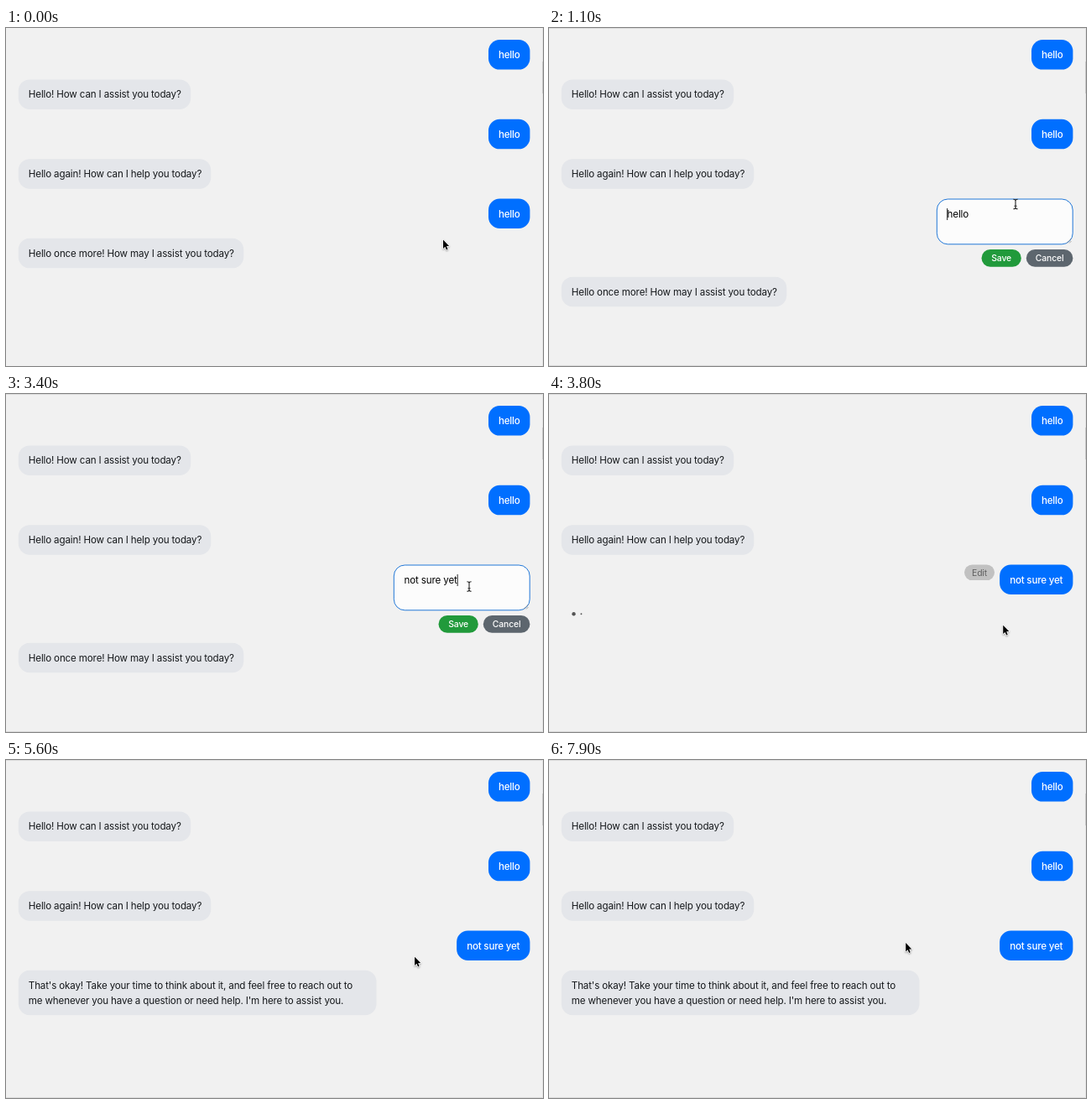
These frames come from a looping animation (640 by 403 pixels, 8 s). An HTML page with a canvas:

```html
<!DOCTYPE html>
<html lang="en">
<head>
<meta charset="utf-8">
<title>Chat message editing</title>
<style>
  html, body { margin: 0; width: 100%; height: 100%; overflow: hidden; background: #f1f1f1; }
  canvas { display: block; width: 640px; height: 403px; }
</style>
</head>
<body>
<canvas id="stage"></canvas>
<script>
const W = 640, H = 403, LOOP = 8000, STEP = 100;
const LEFT = 14.8, RIGHT = 624.4, BUBBLE_H = 35.5, LINE_H = 17.9, PAD = 12;
const FONT = 'Inter, "Liberation Sans", sans-serif';
const EDIT_AT = 700, SELECT_AT = 1700, TYPE_AT = 1900, SAVE_AT = 3750;
const STREAM_AT = 4200, STREAM_END = 4900;
const KEY_MS = 110, WORDS_PER_STEP = 3.5;

const OLD_REPLY = 'Hello once more! How may I assist you today?';
const TYPED = 'not sure yet';
const REPLY = [
  "That's okay! Take your time to think about it, and feel free to reach out to",
  "me whenever you have a question or need help. I'm here to assist you."
].map(line => line.split(' '));

// Pointer stops: time, x, y
const STOPS = [
  [0, 521, 252], [400, 556, 210], [1500, 556, 210], [1800, 552, 229.5],
  [3400, 552, 229.5], [3800, 541.2, 275.2], [5000, 541.2, 274.2], [5900, 460, 214],
  [6200, 493, 214], [6700, 401, 213.7], [7700, 475, 196], [7900, 425.2, 217.5]
];
const ARROW = new Path2D('M0 0V10.3L2.3 8.2L4 11.8L5.5 11.1L4 7.5L7.1 7.3Z');

const canvas = document.getElementById('stage');
const ctx = canvas.getContext('2d');
const dpr = window.devicePixelRatio || 1;
canvas.width = W * dpr;
canvas.height = H * dpr;

const rowY = i => 14.1 + i * 47.35;
const clamp = v => Math.max(0, Math.min(1, v));

function setFont(size = 11.6, weight = 400, spacing = -0.15) {
  ctx.font = `${weight} ${size}px ${FONT}`;
  ctx.letterSpacing = spacing + 'px';
}

function text(str, x, y, color, align = 'left') {
  ctx.fillStyle = color;
  ctx.textAlign = align;
  ctx.fillText(str, x, y);
}

function rect(x, y, w, h, color) {
  ctx.fillStyle = color;
  ctx.fillRect(x, y, w, h);
}

function roundBox(x, y, w, h, r, fill, stroke) {
  ctx.beginPath();
  ctx.roundRect(x, y, w, h, r);
  ctx.fillStyle = fill;
  ctx.fill();
  if (!stroke) return;
  ctx.strokeStyle = stroke;
  ctx.lineWidth = 1;
  ctx.stroke();
}

function botBubble(lines, y, w) {
  roundBox(LEFT, y, w, BUBBLE_H + (lines.length - 1) * LINE_H, 13.4, '#e4e6ea');
  setFont();
  lines.forEach((line, i) => text(line, LEFT + PAD, y + 22 + i * LINE_H, '#15181b'));
}

function userBubble(str, y, w) {
  roundBox(RIGHT - w, y, w, BUBBLE_H, 13.4, '#006fff');
  setFont(11.6, 500, -0.2);
  text(str, RIGHT - w / 2, y + 22, '#fff', 'center');
}

function pill(label, x, y, w, h, fill, color, weight) {
  roundBox(x, y, w, h, h / 2, fill);
  setFont(10.4, weight);
  text(label, x + w / 2, y + h / 2 + 3.7, color, 'center');
}

function editPill(right, alpha) {
  ctx.globalAlpha = clamp(alpha);
  pill('Edit', right - 36, rowY(4), 36, 18.6, '#c1c1c1', '#5f5f5f', 400);
  ctx.globalAlpha = 1;
}

function resizeGrip(x, y) {
  ctx.strokeStyle = '#8a8a8a';
  ctx.lineWidth = 0.7;
  ctx.beginPath();
  for (const d of [5.5, 2.5]) {
    ctx.moveTo(x - d, y);
    ctx.lineTo(x, y - d);
  }
  ctx.stroke();
}

function editor(t) {
  const x = 474.6;
  roundBox(462.3, 204, 161.9, 53.8, 13, '#fcfcfc', '#2278d8');
  resizeGrip(622.5, 256.5);

  const typing = t >= TYPE_AT;
  const selected = t >= SELECT_AT && !typing;
  const str = typing ? TYPED.slice(0, 1 + Math.floor((t - TYPE_AT) / KEY_MS)) : 'hello';
  setFont();
  const w = ctx.measureText(str).width;
  if (selected) rect(x, 215, w, 14, '#b3d7ff');
  text(str, x, 226.3, '#000');
  if (!selected) rect(typing ? x + w : x - 0.4, 215, 0.9, 14, '#111');

  pill('Save', 515.5, 264, 47.3, 20.8, '#219a3b', '#fff', 500);
  pill('Cancel', 568.8, 264, 55.6, 20.8, '#5d666e', '#fff', 500);
}

function typingDots(t) {
  for (let i = 0; i < 3; i++) {
    const phase = ((t - SAVE_AT + 320 - i * 160) / 1400) % 1;
    const up = phase > 0 ? clamp(1 - Math.abs(phase - 0.4) / 0.4) : 0;
    ctx.beginPath();
    ctx.arc(29.5 + i * 8.95, 262.3, 3 * up * up * (3 - 2 * up), 0, Math.PI * 2);
    ctx.fillStyle = '#555';
    ctx.fill();
  }
}

function reply(t) {
  const count = t < STREAM_END ? Math.floor((t - STREAM_AT) / STEP * WORDS_PER_STEP) : Infinity;
  const first = REPLY[0].slice(0, count).join(' ');
  const second = REPLY[1].slice(0, Math.max(0, count - REPLY[0].length)).join(' ');
  setFont();
  const w = second ? 426.7 : ctx.measureText(first).width + PAD * 2;
  botBubble(second ? [first, second] : [first], rowY(5), w);
}

function pointerAt(t) {
  const i = STOPS.findIndex(stop => stop[0] > t);
  if (i < 0) return STOPS.at(-1).slice(1);
  const [t0, x0, y0] = STOPS[i - 1], [t1, x1, y1] = STOPS[i];
  const k = (t - t0) / (t1 - t0);
  return [x0 + (x1 - x0) * k, y0 + (y1 - y0) * k];
}

function arrow(x, y) {
  ctx.save();
  ctx.translate(x, y + 0.6);
  ctx.lineJoin = 'round';
  ctx.strokeStyle = '#fff';
  ctx.lineWidth = 1.5;
  ctx.shadowColor = 'rgba(0, 0, 0, 0.35)';
  ctx.shadowBlur = 2 * dpr;
  ctx.shadowOffsetY = dpr;
  ctx.stroke(ARROW);
  ctx.shadowColor = 'transparent';
  ctx.fillStyle = '#000';
  ctx.fill(ARROW);
  ctx.restore();
}

function iBeam(x, y) {
  ctx.beginPath();
  for (const s of [-1, 1]) {
    ctx.moveTo(x - 2.6, y + s * 5.8);
    ctx.quadraticCurveTo(x, y + s * 5.8, x, y + s * 4);
    ctx.quadraticCurveTo(x, y + s * 5.8, x + 2.6, y + s * 5.8);
  }
  ctx.moveTo(x, y - 4.5);
  ctx.lineTo(x, y + 4.5);
  ctx.moveTo(x - 1.5, y + 2.2);
  ctx.lineTo(x + 1.5, y + 2.2);
  ctx.strokeStyle = '#222';
  ctx.lineWidth = 1.1;
  ctx.stroke();
}

function frameEdges(t) {
  if (t >= EDIT_AT) {
    rect(0, 0, W, 1, '#dcdcdc');
    rect(0, H - 1, W, 1, '#dcdcdc');
  }
  rect(W - 1, 0, 1, H, '#e4e4e4');
  rect(W - 1, 40, 1, 38, '#c8c8c8');
}

function draw(t) {
  ctx.setTransform(dpr, 0, 0, dpr, 0, 0);
  rect(0, 0, W, H, '#f1f1f1');
  frameEdges(t);

  userBubble('hello', rowY(0), 49.4);
  botBubble(['Hello! How can I assist you today?'], rowY(1), 205.4);
  userBubble('hello', rowY(2), 49.4);
  botBubble(['Hello again! How can I help you today?'], rowY(3), 229.4);

  const editing = t >= EDIT_AT && t < SAVE_AT;
  if (editing) {
    editor(t);
    botBubble([OLD_REPLY], 296.7, 268.4);
  } else if (t < EDIT_AT) {
    userBubble('hello', rowY(4), 49.4);
    editPill(569, (t - 100) / 200);
    botBubble([OLD_REPLY], rowY(5), 268.4);
  } else {
    userBubble(TYPED, rowY(4), 87.3);
    editPill(531, 1 - (t - 3800) / 300);
    (t > STREAM_AT ? reply : typingDots)(t);
  }

  const [x, y] = pointerAt(t);
  (editing && y < 258 ? iBeam : arrow)(x, y);
}

function tick() {
  const t = performance.now() % LOOP;
  draw(Math.floor(t / STEP) * STEP);
  requestAnimationFrame(tick);
}
tick();
</script>
</body>
</html>
```
